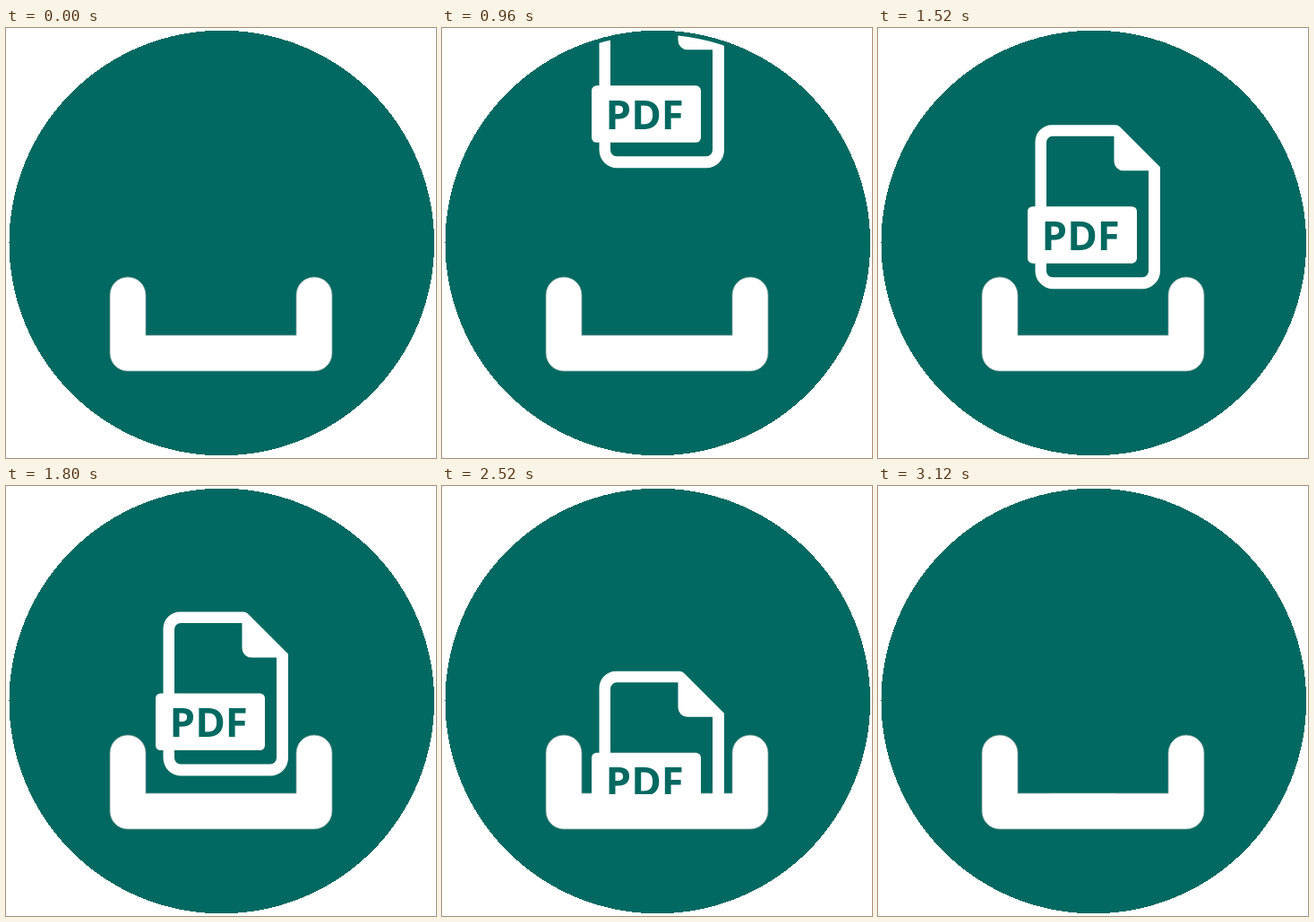
Recreate the animation shown at these times as an HTML page. Size 480 px wide and 480 px high, loop 4 s.

```html
<!DOCTYPE html>
<html lang="en">
<head>
<meta charset="utf-8">
<title>PDF download</title>
<style>
  html, body { margin: 0; width: 100%; height: 100%; overflow: hidden; background: #fff; }
  svg { display: block; width: 100%; height: 100%; }
  text { font: bold 45.5px "Open Sans", "Noto Sans", sans-serif; }
</style>
</head>
<body>
<svg viewBox="0 0 480 480">
  <defs>
    <!-- upper half of the disc, ending at the tray floor -->
    <clipPath id="slot">
      <path d="M3.500 240A237.300 237.300 0 0 1 478 240V344H3.500Z"/>
    </clipPath>
  </defs>
  <circle cx="240.800" cy="240" r="237.300" fill="#016961" shape-rendering="crispEdges"/>
  <path fill="#fff" stroke="#7f9f9c" stroke-width=".8" d="M116 298a20 20 0 0 1 40 0V343H324V298a20 20 0 0 1 40 0V363a20 20 0 0 1-20 20H136a20 20 0 0 1-20-20Z"/>
  <g clip-path="url(#slot)">
    <g id="page" fill="#fff">
      <path fill-rule="evenodd" d="
        M194 0H265Q268 0 270 2L315 47V163a20 20 0 0 1-20 20H195.500a20 20 0 0 1-20-20V18.500A18.500 18.500 0 0 1 194 0Z
        M195 12.500a7 7 0 0 0-7 7V163a7 7 0 0 0 7 7H295a7 7 0 0 0 7-7V51H274a10.500 10.500 0 0 1-10.500-10.500V12.500Z"/>
      <rect x="167" y="91" width="122" height="63.500" rx="5.500"/>
      <text x="182.600" y="139.500" fill="#016961">PDF</text>
    </g>
  </g>
</svg>
<script>
  const LOOP = 4000;
  const STEP = 40;
  // [time in ms, top edge of the page]: drop in, drift, drop into the tray
  const KEYS = [[0, -258], [1600, 127.5], [2400, 179.5], [4000, 544]];
  const page = document.getElementById("page");

  function pageTop(time) {
    const next = KEYS.findIndex(([t]) => t > time);
    const [t0, y0] = KEYS[next - 1];
    const [t1, y1] = KEYS[next];
    return y0 + (y1 - y0) * (time - t0) / (t1 - t0);
  }

  function render(now) {
    const time = Math.floor((now % LOOP) / STEP) * STEP;
    page.setAttribute("transform", `translate(0 ${pageTop(time)})`);
  }

  let start;
  function tick(now) {
    start ??= now;
    render(now - start);
    requestAnimationFrame(tick);
  }

  render(0);
  requestAnimationFrame(tick);
</script>
</body>
</html>
```
